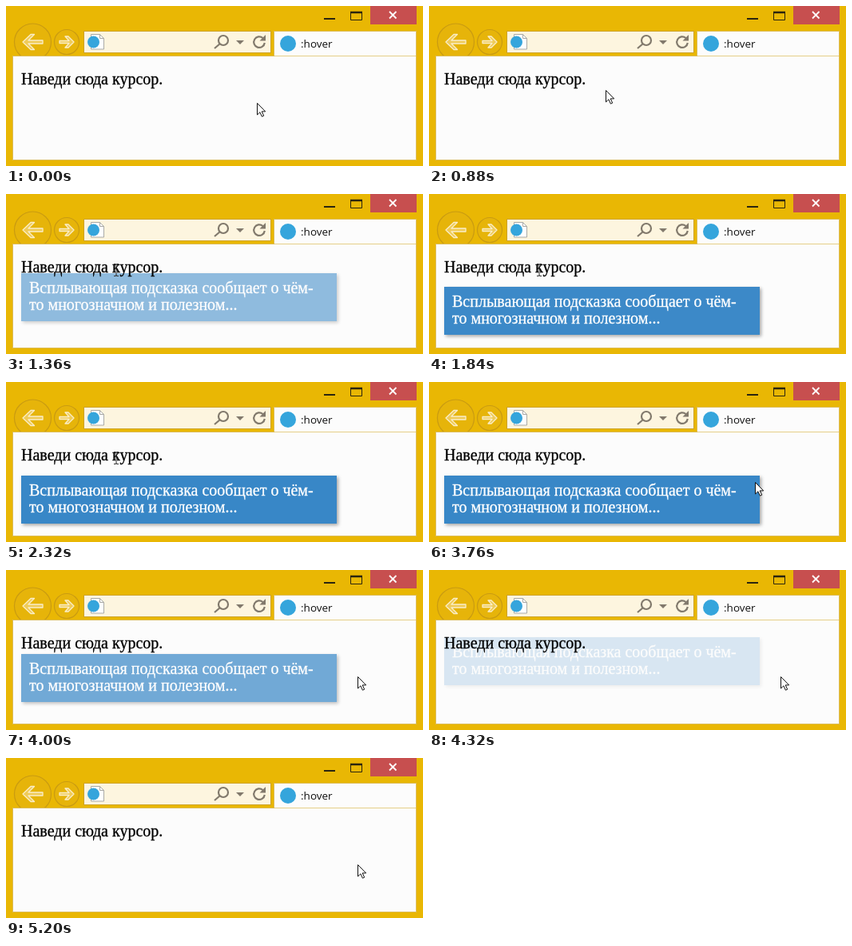
An HTML page for the animation above (5280 ms loop, 522x200 px).

```html
<!DOCTYPE html>
<html lang="ru">
<head>
<meta charset="utf-8">
<title>:hover</title>
<style>
  html, body { margin: 0; width: 100%; height: 100%; overflow: hidden; background: #e9b704; }
  svg { display: block; width: 522px; height: 200px; }
  .serif { font: 20px "Liberation Serif", "Times New Roman", serif; stroke-width: .3; }
  .tab { font: 13.5px "Open Sans", "Noto Sans", sans-serif; }
  .ring { fill: #e6b40a; stroke: #c99b12; stroke-width: 1.2; }
  .nav { fill: #efcb58; stroke: #faedc8; stroke-width: 1.3; stroke-linejoin: round; }
  .tool { fill: none; stroke: #81796c; stroke-width: 2.2; }
  #tip rect { fill: #3887c7; filter: drop-shadow(2px 2px 2px rgba(0, 0, 0, .35)); }
  #tip text { fill: #fff; stroke: #fff; }
</style>
</head>
<body>
<svg viewBox="0 0 522 200">
  <rect width="522" height="200" fill="#e9b704"/>

  <!-- Window buttons -->
  <rect x="456" width="58" height="23" fill="#c74f4f"/>
  <path d="M480 7l8.500 8.500m0-8.500l-8.500 8.500" stroke="#fff" stroke-width="1.8"/>
  <path d="M398 16h14" stroke="#2b250f" stroke-width="2"/>
  <path d="M431.500 7v10.500h14V7" fill="none" stroke="#2b250f"/>
  <path d="M431 8h15" stroke="#2b250f" stroke-width="2.500"/>

  <!-- Navigation -->
  <circle class="ring" cx="33.500" cy="45" r="23"/>
  <circle class="ring" cx="76" cy="45" r="15.500"/>
  <path class="nav" d="M21 45l10-9.500h4.500l-7.500 7.500H46v4H28l7.500 7.500H31z"/>
  <path class="nav" d="M85 45l-7-7h-4l5 5.500H67v3h12L74 52h4z"/>

  <!-- Address field -->
  <rect x="97.500" y="31.500" width="234" height="27" fill="#fdf5df" stroke="#cda329"/>
  <path d="M106.500 35.500h11l5 5v13.500h-16z" fill="#fff" stroke="#a9a9a5"/>
  <path d="M117.500 35.500v5h5" fill="none" stroke="#a9a9a5"/>
  <circle cx="109.500" cy="45" r="7.500" fill="#35a5dc"/>
  <circle class="tool" cx="272" cy="43" r="6"/>
  <path class="tool" d="M268 47l-7 6"/>
  <path d="M288 43h10l-5 5z" fill="#81796c"/>
  <path class="tool" d="M321.500 40A6.800 6.800 0 1 0 323.800 46"/>
  <path d="M325 36v7.500h-7.500z" fill="#81796c"/>

  <!-- Page and tab -->
  <rect x="8.500" y="62.500" width="505" height="130" fill="#fcfcfc" stroke="#dcbc58"/>
  <path d="M335.500 63V31.500h178V63" fill="#fcfcfc" stroke="#dcbc58"/>
  <path d="M336 62.500h177" stroke="#e6cf87"/>
  <circle cx="353" cy="47" r="10" fill="#35a5dc"/>
  <text class="tab" x="369" y="52" fill="#111">:hover</text>

  <g id="tip" class="serif">
    <rect x="19" width="395" height="60"/>
    <text x="29" y="25">Всплывающая подсказка сообщает о чём-</text>
    <text x="29" y="46">то многозначном и полезном...</text>
  </g>
  <text class="serif" x="19" y="97.500" stroke="#000">Наведи сюда курсор.</text>

  <path id="pointer" d="M.5.5v14.500l3.400-3.200 2.500 5.400 2.300-1-2.500-5.300h4.500z" fill="#fff" stroke="#111"/>
  <path id="beam" d="M-3-7.500h2q1 0 1 1 0-1 1-1h2M0-7v14M-3 7.500h2q1 0 1-1 0 1 1 1h2" fill="none" stroke="#333"/>
</svg>
<script>
const LOOP = 5280, STEP = 80, FADE = 1000;
const SHOW_AT = 1040, HIDE_AT = 3800;
// time, x, y
const path = [
  [0, 314, 121], [400, 314, 121], [1040, 190, 100], [1280, 138, 95],
  [2480, 138, 95], [2960, 293, 97], [3800, 414, 126], [4000, 440, 133], [LOOP, 440, 133]
];
const [tip, pointer, beam] = ['tip', 'pointer', 'beam'].map(id => document.getElementById(id));
const clamp = v => Math.min(1, Math.max(0, v));
const bezier = (a, b, u) => 3 * a * u * (1 - u) ** 2 + 3 * b * u * u * (1 - u) + u ** 3;

// CSS "ease": cubic-bezier(.25, .1, .25, 1)
function ease(x) {
  let low = 0, high = 1;
  for (let i = 0; i < 20; i++) {
    const mid = (low + high) / 2;
    if (bezier(.25, .25, mid) < x) low = mid; else high = mid;
  }
  return bezier(.1, 1, low);
}

function cursorAt(t) {
  const i = path.findIndex(([time]) => time > t);
  const [t0, x0, y0] = path[i - 1], [t1, x1, y1] = path[i];
  const k = (t - t0) / (t1 - t0);
  return [x0 + (x1 - x0) * k, y0 + (y1 - y0) * k].map(Math.round);
}

function draw(t) {
  const shown = t < HIDE_AT
    ? ease(clamp((t - SHOW_AT) / FADE))
    : 1 - ease(clamp((t - HIDE_AT) / FADE));
  tip.setAttribute('opacity', shown < .002 ? 0 : shown);
  tip.setAttribute('transform', `translate(0 ${Math.round(77 + 40 * shown)})`);

  const [x, y] = cursorAt(t);
  const overText = x < 198 && y < 101;
  pointer.style.display = overText ? 'none' : '';
  beam.style.display = overText ? '' : 'none';
  (overText ? beam : pointer).setAttribute('transform', `translate(${x} ${y})`);
}

const start = performance.now();
function tick(now) {
  const t = Math.max(0, now - start) % LOOP;
  draw(t < 2 * STEP ? 0 : Math.floor(t / STEP) * STEP);
  requestAnimationFrame(tick);
}
draw(0);
requestAnimationFrame(tick);
</script>
</body>
</html>
```
